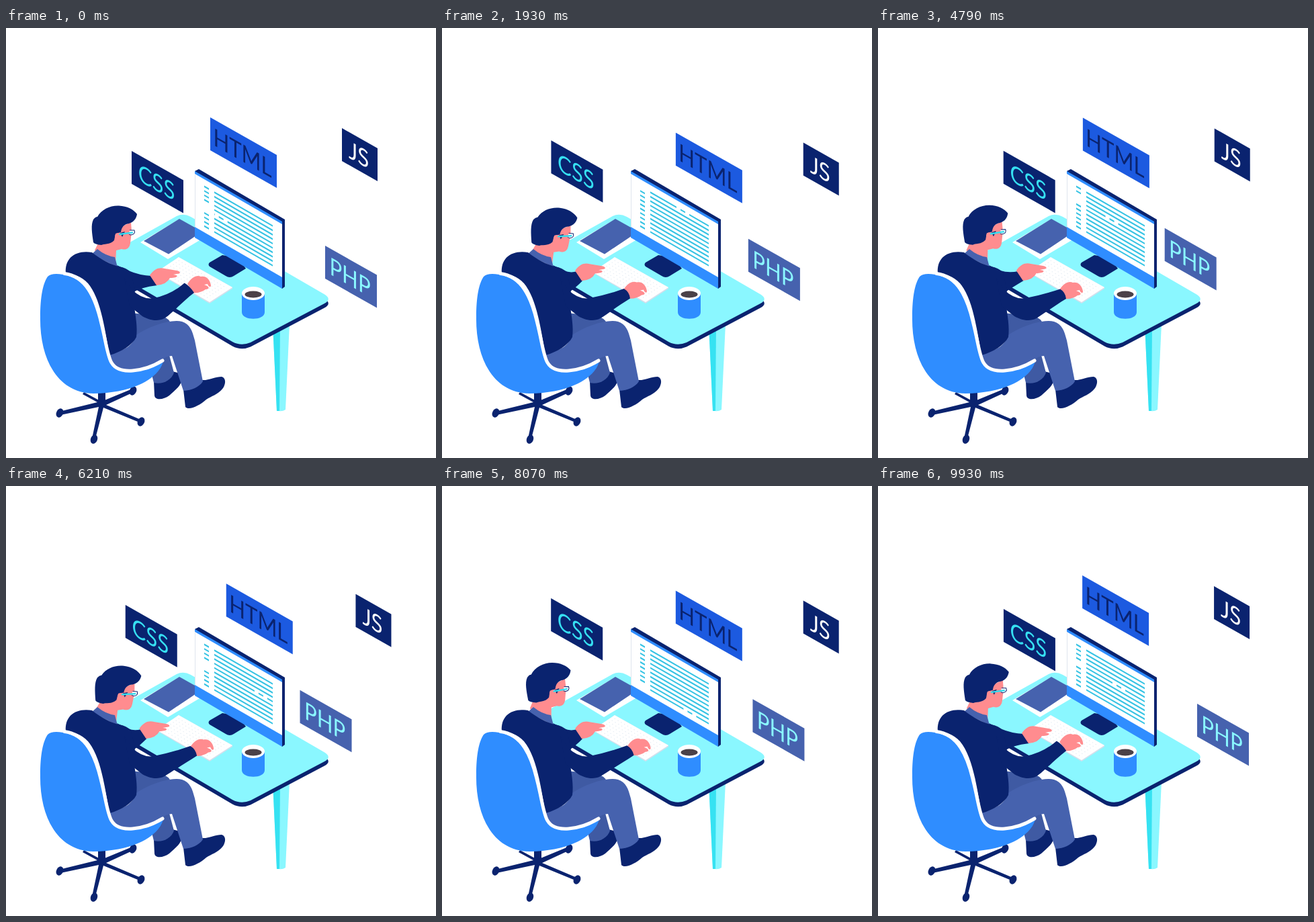
An HTML page for the animation above (10000 ms loop, 640x640 px).

```html
<!DOCTYPE html>
<html lang="en">
<head>
<meta charset="utf-8">
<title>Developer at a desk</title>
<style>
html,body{margin:0;width:100%;height:100%;overflow:hidden;background:#fff}
svg{display:block;width:100vw;height:100vh}
text{font:36px Lato,"Open Sans",sans-serif;text-anchor:middle}
.navy{fill:#0a236f}.blue{fill:#2f8dff}.mid{fill:#4662ae}.dim{fill:#3f5aa3}
.sky{fill:#8af7ff}.skin{fill:#ff8c8f}.white{fill:#fff}
.line{fill:none;stroke-linejoin:round}
.round{stroke-linecap:round}
</style>
</head>
<body>
<svg viewBox="0 0 640 640">
  <defs>
    <path id="top" d="M254 280Q264 275 275 281L475 397Q485 404 474 410L364 468Q350 474 337 467L175 372Q163 364 163 352L161 332Z"/>
    <ellipse id="wheel" rx="5" ry="7"/>
  </defs>

  <!-- desk -->
  <path class="sky" d="M397 440H422L416 568Q410 572 403 569Z"/>
  <path fill="#36e2f2" d="M397 440H408L407 570H403Z"/>
  <use href="#top" class="navy" y="6.5"/>
  <use href="#top" class="sky"/>

  <!-- notebook -->
  <path class="white" d="M200 319L257 285L300 309L241 344Z"/>
  <path class="mid" d="M205 317L258 284L292 303L242 336.5Z"/>

  <!-- monitor -->
  <path class="navy" d="M303 349L322 338L345 342L357 358L339 369Q333 373 327 369L303 355Q300 352 303 349Z"/>
  <path class="navy" d="M281 213L287 210L415 285V385L411 388Z"/>
  <path class="blue" d="M281 213L411 288V388L281 312Z"/>
  <path class="white" d="M281 217L411 292V371L281 296Z"/>
  <path class="line" stroke="#dfe5ee" d="M281.5 217V296"/>
  <path id="code" class="line" stroke="#35c3e4" stroke-width="2.4" transform="matrix(1 .577 0 1 281 217)"/>

  <!-- keyboard -->
  <path fill="#d3dfec" d="M224 364L303 410L337 388V386L257 341Z"/>
  <path class="white" d="M224 363L257 341L337 386L303 408Z"/>
  <path id="keys" class="line" stroke="#e6edf4" stroke-width="1.2" stroke-dasharray="1.5 4"/>

  <!-- mug -->
  <path class="blue" d="M351 395V423C351 436 385 436 385 423V395Z"/>
  <ellipse class="white" cx="368" cy="395" rx="17" ry="10"/>
  <ellipse fill="#4b4148" cx="368" cy="396.5" rx="12.5" ry="5"/>

  <!-- chair base -->
  <g class="navy">
    <path d="M137 536H148V558H137Z"/>
    <path d="M116 542L142 556L188 537L190 542L149 561L203 584L201 588L145 565L133 611H128L138 564L81 576L79 571L136 557L114 545Z"/>
    <use href="#wheel" transform="translate(189 540) rotate(25)"/>
    <use href="#wheel" transform="translate(201 586) rotate(25)"/>
    <use href="#wheel" transform="translate(131 612) rotate(20)"/>
    <use href="#wheel" transform="translate(80 573) rotate(25)"/>
  </g>

  <!-- legs and seat -->
  <path class="navy" d="M220 526L248 511C256 514 262 513 262 520C262 533 250 540 243 547C235 553 222 555 221 547Z"/>
  <path class="dim" d="M213 500L243 487L250 513C246 525 232 531 220 528Z"/>
  <path class="dim" d="M185 424L226 428Q240 430 244 437L194 465Z"/>
  <path class="navy" d="M264 538L292 524C300 525 312 519 321 519C328 521 327 530 323 536C315 546 305 548 298 553C288 562 272 570 267 564Z"/>
  <path class="blue" d="M62 370Q68 364 85 367C118 373 132 400 141 440C148 470 150 490 155 498C165 516 195 515 234 496C230 515 200 543 130 544C75 543 50 490 51 430C51 400 55 380 62 370Z"/>
  <path class="mid" d="M150 485C175 481 190 473 192 458C215 443 245 433 262 437C274 441 277 450 281 465L293 526C287 535 277 539 264 540L247 488Q238 488 231 495C205 510 185 512 173 510C162 506 157 496 150 485Z"/>

  <!-- head -->
  <g id="head">
    <path class="skin" d="M132 331L140 314L163 300L186 289L187 303L185 320C184 328 179 331 172 329L164 331L163 352C152 348 142 341 132 331Z"/>
    <path class="navy" d="M130 319C128 305 126 293 130 285Q133 281 136 281C142 270 155 264 168 264.5C180 265 190 270 195 277C194 284 190 289 183 291C176 292 172 296 171 304L163 306L161 316C155 323 145 321 142 323Q132 322 130 319Z"/>
    <ellipse class="skin" cx="166.5" cy="311" rx="4.5" ry="6"/>
    <path class="navy" d="M170 305L177 303L173 311Z"/>
    <path class="line" stroke="#0a236f" style="fill:#fff" d="M184 301L191 301Q193 307 186 308L183 307"/>
    <path class="line round" stroke="#36dcee" stroke-width="2.5" d="M169 307L188 304.500"/>
  </g>

  <!-- torso and arms -->
  <path class="mid" d="M127 337L136 329Q148 339 162 341L166 356Z"/>
  <path class="navy" id="farArm"/>
  <path class="navy" d="M89 365C87 342 104 330 128 334C142 345 156 352 168 355Q180 357 186 364L192 390L190 408C193 430 196 445 194 460C188 472 172 482 154 487C146 440 140 402 122 380C112 369 100 366 89 365Z"/>
  <path class="line round" stroke="#fff" stroke-width="5" d="M87 365.5C118 369 133 400 142 440C149 468 151 488 157 498C168 517 205 512 233 495"/>
  <path class="skin" id="farHand" d="M198 361C205 351 212 349 220 351L238 354C244 355 245 359 238 359L233 360C243 361 239 365 228 365Q223 375 208 376Z"/>
  <path class="skin" id="nearHand" d="M270 390C276 380 284 376 290 379C298 377 304 384 305 392C305 396 301 394 300 390L295 391C304 394 303 398 297 398C292 402 284 404 279 403Z"/>
  <path class="navy" id="nearArm"/>

  <g id="tags"></g>
</svg>
<script>
const LOOP = 10000, TAU = 2 * Math.PI, SLOPE = .566;
const {sin, cos, max, min, abs, floor} = Math;
const $ = id => document.getElementById(id);
const set = (id, k, v) => $(id).setAttribute(k, v);
const move = (x, y) => `translate(${x} ${y})`;

// Each tag drifts by (dx, dy) and back, `turns` times per loop; lean and sway bend its timing.
const tags = [
  {text: 'CSS', x: 187, y: 183, dx: -25, dy: -16, w: 77, bg: '#0a236f', ink: '#36e0f2', turns: 2, lean: .03, sway: .065},
  {text: 'HTML', x: 304, y: 133, dx: 50, dy: 26, w: 99, bg: '#1c5ae0', ink: '#0a236f', turns: 2, lean: 0, sway: 0},
  {text: 'JS', x: 500, y: 149, dx: 43, dy: 24.5, w: 53, bg: '#0a236f', ink: '#fff', turns: 2, lean: 0, sway: 0},
  {text: 'PHP', x: 475, y: 324, dx: -48.5, dy: -26.3, w: 77, bg: '#4662ae', ink: '#8af7ff', turns: 1, lean: .04, sway: 0}
];
$('tags').innerHTML = tags.map(({w, bg, ink, text}) => `<g>
  <path fill="${bg}" d="M0 0l${w} ${w * SLOPE}v49L0 49Z"/>
  <text fill="${ink}" transform="matrix(.866 .49 0 1 ${w / 2 - 1.5} ${37.6 + w / 2 * SLOPE})">${text}</text></g>`).join('');
const tagNodes = [...$('tags').children];

let keys = '';
for (let i = 1; i < 8; i++) keys += `M${228 + i * 4.1} ${365.3 - i * 2.75}l72 41`;
set('keys', 'd', keys);

// Ten rows of code; the caret row is rewritten from left to right.
function codePath(u) {
  const row = floor(u), x = 29 + 87 * (u % 1);
  let d = '';
  const dash = (a, b, y) => { if (a < min(b, 116)) d += `M${a} ${y}H${min(b, 116)}`; };
  for (let i = 0; i < 10; i++) {
    const y = 10.7 + 6.55 * i;
    if (abs(i + .5 - u) > .9) dash(14, 21, y);
    dash(29, i === row ? x : 116, y);
    if (i !== row) continue;
    dash(x + 6, x + 13, y);
    dash(x + 19, 116, y);
  }
  return d;
}

function drawArms(t) {
  const c = cos(TAU * t), reach = max(0, c) ** 3;
  const fx = max(0, cos(2 * TAU * t)) * (12 + 4 * c), fy = 7 * reach;
  const nx = 6 * max(0, -sin(TAU * t)), ny = -9 * reach - nx / 3;
  const cx = nx + ny * .6;
  set('farHand', 'transform', move(fx, fy));
  set('nearHand', 'transform', move(nx, ny));
  set('farArm', 'd', `M165 353L182 361Q${190 + fx * .6} ${365 + fy * .5} ${201 + fx} ${362 + fy}
    Q${207 + fx} ${368 + fy} ${209 + fx} ${376 + fy}Q200 386 188 394Z`);
  set('nearArm', 'd', `M176 372L188 390Q204 405 220 402Q246 397 ${271 + cx} ${388.5 + ny}
    Q${279 + cx} ${393 + ny} ${280 + nx} ${403 + ny}C${262 + nx} ${414 + ny * .7} 247 425 236 432C224 438 212 434 203 429L184 414Z`);
}

function draw(t) {
  tags.forEach((g, i) => {
    const phase = t + g.lean * sin(Math.PI * t) + g.sway * sin(TAU * t);
    const p = (1 - cos(TAU * g.turns * phase)) / 2;
    tagNodes[i].setAttribute('transform', move(g.x + g.dx * p, g.y + g.dy * p));
  });
  const nod = .95 + 3.65 * sin(2 * TAU * t - .26 - .75 * sin(TAU * t));
  set('head', 'transform', `rotate(${nod} 130 360)`);
  set('code', 'd', codePath((5 + 80 * t) % 10));
  drawArms(t);
}

function tick(now) {
  draw(now % LOOP / LOOP);
  requestAnimationFrame(tick);
}
draw(0);
requestAnimationFrame(tick);
</script>
</body>
</html>
```
